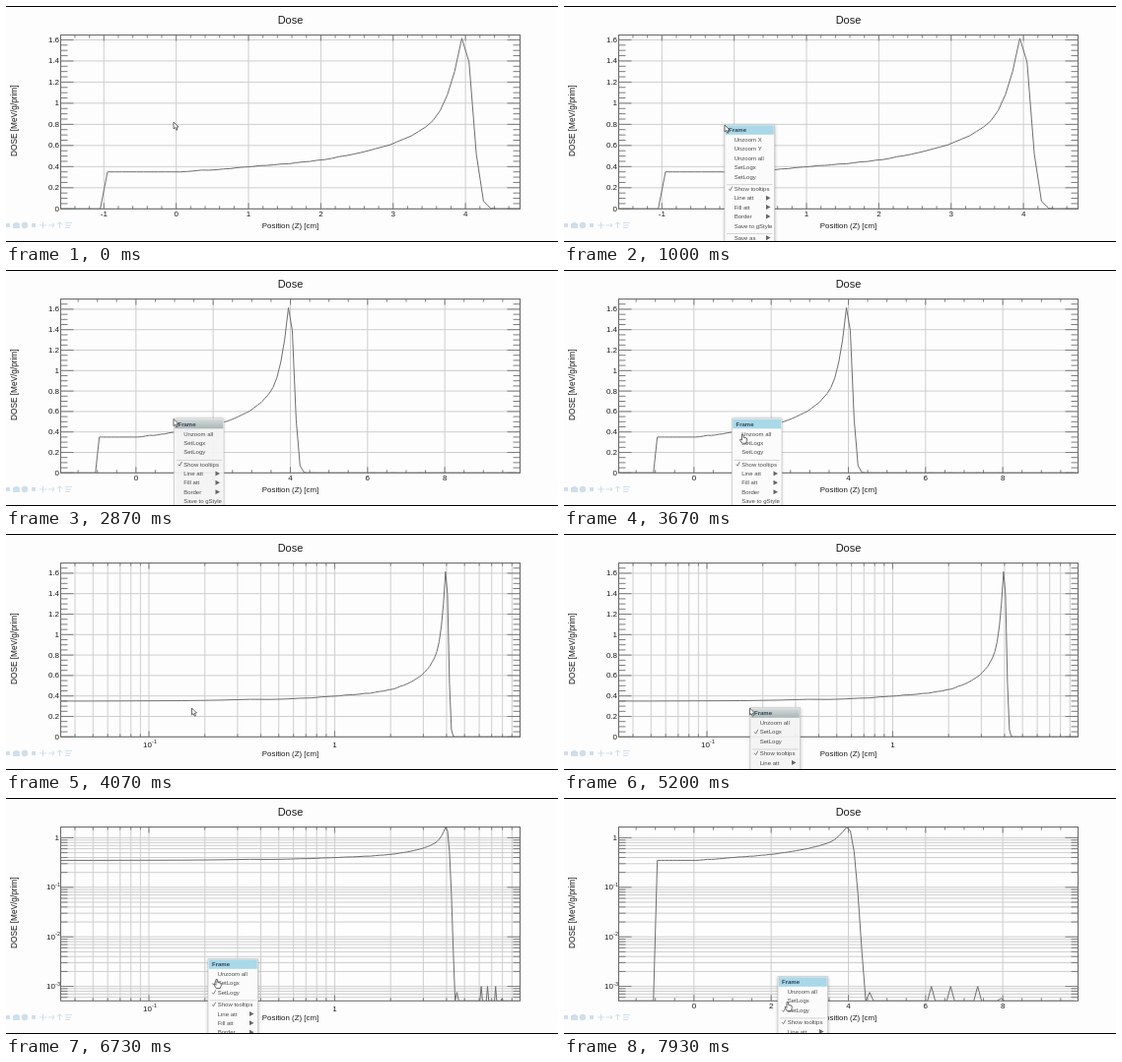
An HTML page with a canvas that plays this animation: 560x240 px, repeating every 8 s.

```html
<!DOCTYPE html>
<html lang="en">
<head>
<meta charset="utf-8">
<title>Dose</title>
<style>
html, body { margin: 0; width: 100%; height: 100%; overflow: hidden; background: #fdfdfd; }
canvas { display: block; }
</style>
</head>
<body>
<canvas id="stage" width="560" height="240"></canvas>
<script>
const ctx = document.getElementById('stage').getContext('2d');
const LOOP = 8000;
const FONT = '"Liberation Sans", Arial, sans-serif';
const L = 55.5, R = 521.5, T = 29.5, B = 206.3;

// Axis ranges
const xZoom = { lo: -1.597, hi: 4.755, major: 1, parts: 5 };
const xFull = { lo: -1.95, hi: 9.95, major: 2, parts: 4 };
const xLog = { lo: 0.0335, hi: 9.95, log: true };
const yZoom = { lo: 0, hi: 1.646, major: 0.2, parts: 4 };
const yFull = { lo: 0, hi: 1.7, major: 0.2, parts: 4 };
const yLog = { lo: 5.1e-4, hi: 1.65, log: true };

const views = [
  [0, xZoom, yZoom], [2400, xFull, yFull], [4000, xLog, yFull],
  [5730, xLog, yLog], [6800, xFull, yLog]
];

// Context menus: open, close, left, top, zoomed, log x, log y
const menus = [
  [800, 2400, 163, 121, true, false, false],
  [2870, 4000, 170.5, 151.5, false, false, false],
  [5130, 5730, 189, 177, false, true, false],
  [6530, 6800, 205, 164, false, true, true],
  [7600, 8000, 217, 182, false, false, true]
];

// Pointer: time, tip x, tip y, shape
const pointer = [
  [0, 170, 118, 'arrow'], [70, 170, 118, 'arrow'], [270, 163, 121, 'arrow'],
  [1270, 163, 121, 'arrow'], [1400, 170, 131, 'hand'], [1730, 185, 154, 'hand'],
  [2400, 185, 154, 'hand'], [2400, 170, 151.5, 'arrow'], [3270, 170, 151.5, 'arrow'],
  [3400, 174, 157, 'hand'], [3930, 188.5, 177, 'hand'], [4000, 188.5, 177, 'arrow'],
  [5600, 188.5, 177, 'hand'], [5700, 197, 207, 'hand'], [5730, 197.5, 208.5, 'cross'],
  [6270, 197.5, 208.5, 'cross'], [6330, 200, 194, 'arrow'], [6470, 205, 164, 'arrow'],
  [6600, 206, 168, 'hand'], [6730, 214, 184.5, 'hand'],
  [6800, 214, 184.5, 'hand'], [6800, 217, 190, 'arrow'], [7270, 217, 190, 'arrow'],
  [7400, 217, 182.5, 'arrow'], [7670, 217, 182.5, 'arrow'],
  [7730, 219, 190, 'hand'], [7930, 227, 207.5, 'hand'], [8000, 227, 207.5, 'hand']
];

// Depth-dose curve, sampled on 0.1 cm bins
const knots = [
  [-0.95, 0.35], [0.1, 0.35], [0.3, 0.364], [0.55, 0.37], [1.05, 0.402], [1.55, 0.428],
  [2.05, 0.466], [2.55, 0.531], [2.95, 0.605], [3.25, 0.69], [3.45, 0.775], [3.55, 0.835],
  [3.65, 0.93], [3.75, 1.08], [3.85, 1.3], [3.95, 1.615], [4.05, 1.39],
  [4.15, 0.52], [4.25, 0.07], [4.35, 0.005], [4.45, 0]
];
const spikes = { 4.55: 7.6e-4, 6.15: 1e-3, 6.65: 1e-3, 7.35: 1e-3, 7.95: 5.7e-4 };

function dose(z) {
  if (z < -0.96) return 0;
  if (z > 4.44) return spikes[z.toFixed(2)] || 0;
  const i = Math.max(1, knots.findIndex(k => k[0] >= z - 0.001));
  const [a, va] = knots[i - 1], [b, vb] = knots[i];
  const ripple = z > 0.2 && z < 2.6 ? 0.002 * Math.sin(z * 23) : 0;
  return va + (vb - va) * (z - a) / (b - a) + ripple;
}
const curve = Array.from({ length: 119 }, (_, i) => {
  const z = Math.round((i * 0.1 - 1.95) * 100) / 100;
  return [z, dose(z)];
});

function fraction(axis, v) {
  if (!axis.log) return (v - axis.lo) / (axis.hi - axis.lo);
  return Math.log(Math.max(v, axis.lo) / axis.lo) / Math.log(axis.hi / axis.lo);
}
const toX = (axis, v) => L + (R - L) * fraction(axis, v);
const toY = (axis, v) => B - (B - T) * fraction(axis, v);

function ticks(axis) {
  const list = [];
  if (axis.log) {
    for (let e = -4; e < 1; e++)
      for (let m = 1; m < 10; m++) list.push({ v: m * 10 ** e, major: m === 1, exp: e });
  } else {
    const step = axis.major / axis.parts;
    for (let n = Math.ceil(axis.lo / step); n * step < axis.hi; n++)
      list.push({ v: n * step, major: n % axis.parts === 0 });
  }
  return list.filter(t => t.v >= axis.lo && t.v <= axis.hi);
}

function line(x1, y1, x2, y2, color, width = 1) {
  ctx.strokeStyle = color;
  ctx.lineWidth = width;
  ctx.beginPath();
  ctx.moveTo(x1, y1);
  ctx.lineTo(x2, y2);
  ctx.stroke();
}

function text(str, x, y, size, align = 'left', weight = '', color = '#1a1a1a') {
  ctx.font = `${weight} ${size}px ${FONT}`;
  ctx.textAlign = align;
  ctx.fillStyle = color;
  ctx.fillText(str, x, y);
}

function tickLabel(t, x, y, align) {
  if (!t.exp) {
    text(String(Math.round(t.v * 10) / 10), x, y, 8, align);
  } else {
    const right = align === 'center' ? x + 8 : x + 1;
    text('10', right - 5, y, 8, 'right');
    text(t.exp, right, y - 3.5, 5.5, 'right');
  }
}

function drawPlot(xa, ya) {
  const xt = ticks(xa), yt = ticks(ya);
  const grid = '#cecece', dark = '#7c7c7c';
  for (const t of xt)
    if (xa.log || t.major) line(toX(xa, t.v), T, toX(xa, t.v), B, grid);
  for (const t of yt)
    if (ya.log || t.major) line(L, toY(ya, t.v), R, toY(ya, t.v), grid);

  for (const t of xt) {
    const x = toX(xa, t.v), len = t.major ? 6 : 3;
    line(x, B, x, B - len, dark);
    line(x, T, x, T + len, dark);
    if (t.major) tickLabel(t, x, xa.log ? 216.5 : 214, 'center');
  }
  for (const t of yt) {
    const y = toY(ya, t.v), len = t.major ? 13 : 7;
    line(L, y, L + len, y, dark);
    line(R, y, R - len, y, dark);
    if (t.major) tickLabel(t, 54, y + 2.5, 'right');
  }
  ctx.strokeStyle = '#666';
  ctx.lineWidth = 1;
  ctx.strokeRect(L, T, R - L, B - T);

  ctx.save();
  ctx.beginPath();
  ctx.rect(L, T, R - L, B - T);
  ctx.clip();
  ctx.beginPath();
  for (const [z, v] of curve)
    if (!xa.log || z > 0) {
      if (xa.log && z < 0.06) ctx.lineTo(L, toY(ya, v));
      ctx.lineTo(toX(xa, z), toY(ya, v));
    }
  ctx.strokeStyle = '#6e6e6e';
  ctx.stroke();
  ctx.restore();
}

function drawTitles() {
  text('Dose', 288.5, 18, 11, 'center');
  text('Position (Z) [cm]', 288.5, 226, 7.9, 'center');
  ctx.save();
  ctx.translate(11.4, 116.7);
  ctx.rotate(-Math.PI / 2);
  text('DOSE [MeV/g/prim]', 0, 0, 8.25, 'center');
  ctx.restore();
}

function drawToolbar() {
  const c = '#cfdfeb', y = 223;
  ctx.fillStyle = c;
  ctx.fillRect(0, y - 2, 4, 4);
  ctx.fillRect(7, y - 2, 7, 5);
  ctx.fillRect(9, y - 3, 3, 2);
  ctx.beginPath();
  ctx.arc(19, y, 3.2, 0, 7);
  ctx.fill();
  ctx.fillRect(26, y - 2, 4, 4);
  line(34, y, 41, y, c);
  line(37.5, y - 3.5, 37.5, y + 3.5, c);
  line(43, y, 49, y, c);
  line(47, y - 2, 49, y, c);
  line(47, y + 2, 49, y, c);
  line(54.5, y - 3, 54.5, y + 3, c);
  line(52, y - 1, 54.5, y - 3, c);
  line(57, y - 1, 54.5, y - 3, c);
  for (let i = 0; i < 3; i++) line(60, y - 2.5 + i * 2.5, 67 - i, y - 2.5 + i * 2.5, c);
}

function drawMenu(t, [open, , x, y, zoomed, logX, logY]) {
  const fresh = t < open + 130, w = 50.5;
  ctx.save();
  ctx.globalAlpha = fresh ? 0.9 : 1;
  ctx.shadowColor = 'rgba(0,0,0,.3)';
  ctx.shadowBlur = 3;
  ctx.fillStyle = '#fbfbfb';
  ctx.fillRect(x, y - 0.5, w, 160);
  ctx.restore();
  ctx.strokeStyle = '#c8c8c8';
  ctx.lineWidth = 0.7;
  ctx.strokeRect(x, y - 0.5, w, 160);

  const header = ctx.createLinearGradient(0, y, 0, y + 10);
  header.addColorStop(0, fresh ? '#d6dcdc' : '#a9d8e8');
  header.addColorStop(1, fresh ? '#a9b4b5' : '#a9d8e8');
  ctx.fillStyle = header;
  ctx.fillRect(x + 0.7, y + 0.3, w - 1.4, 9.5);
  text('Frame', x + 4, y + 7.3, 6, 'left', 'bold', '#345');

  const items = [
    ...(zoomed ? ['Unzoom X', 'Unzoom Y'] : []), 'Unzoom all',
    (logX ? '✓' : '') + 'SetLogx', (logY ? '✓' : '') + 'SetLogy', '-',
    '✓Show tooltips', 'Line att>', 'Fill att>', 'Border>', 'Save to gStyle', '-', 'Save as>'
  ];
  let base = y + 17;
  for (const item of items) {
    if (item === '-') {
      line(x + 2, base - 3.3, x + w - 2, base - 3.3, '#ccc', 0.8);
      base += 2.9;
      continue;
    }
    text(item.replace(/[✓>]/g, ''), x + 9.7, base, 6, 'left', '', '#4a4a4a');
    if (item[0] === '✓') {
      line(x + 4.3, base - 2, x + 5.6, base - 0.4, '#666', 0.8);
      line(x + 5.6, base - 0.4, x + 7.8, base - 4.5, '#666', 0.8);
    }
    if (item.endsWith('>')) shape(x + 42, base - 4.6, [[0, 0], [4.5, 2.5], [0, 5]], '#666');
    base += 9.4;
  }
}

function shape(x, y, points, fill, stroke) {
  ctx.beginPath();
  for (const [px, py] of points) ctx.lineTo(x + px, y + py);
  ctx.closePath();
  ctx.fillStyle = fill;
  ctx.fill();
  if (stroke) {
    ctx.strokeStyle = stroke;
    ctx.lineWidth = 0.8;
    ctx.stroke();
  }
}

const arrow = [[0, 0], [0, 7], [1.6, 5.6], [2.8, 8.2], [4, 7.7], [2.9, 5.2], [5, 5]];
const hand = [[-1, 0], [0.5, 0], [0.7, 3], [4, 3.7], [4.3, 6], [3.2, 9], [-0.8, 9], [-3, 5.3], [-2, 4.8], [-1, 5.8]];

function drawPointer(t) {
  let i = 0;
  while (i < pointer.length - 2 && pointer[i + 1][0] <= t) i++;
  const [t0, x0, y0, kind] = pointer[i], [t1, x1, y1] = pointer[i + 1];
  const k = (t - t0) / (t1 - t0);
  const x = x0 + (x1 - x0) * k, y = y0 + (y1 - y0) * k;
  if (kind === 'cross') {
    line(x - 4.5, y, x + 4.5, y, '#111', 1.2);
    line(x, y - 4.5, x, y + 4.5, '#111', 1.2);
  } else {
    shape(x, y, kind === 'hand' ? hand : arrow, '#fff', '#444');
  }
}

function draw(now) {
  const t = now % LOOP;
  ctx.fillStyle = '#fdfdfd';
  ctx.fillRect(0, 0, 560, 240);
  const [, xa, ya] = views.filter(v => v[0] <= t).pop();
  drawPlot(xa, ya);
  drawTitles();
  drawToolbar();
  for (const m of menus) if (t >= m[0] && t < m[1]) drawMenu(t, m);
  drawPointer(t);
  ctx.fillStyle = '#000';
  ctx.fillRect(0, 0, 560, 1);
  ctx.fillRect(0, 239, 560, 1);
}

const start = performance.now();
function tick() {
  draw(performance.now() - start);
  requestAnimationFrame(tick);
}
tick();
</script>
</body>
</html>
```
